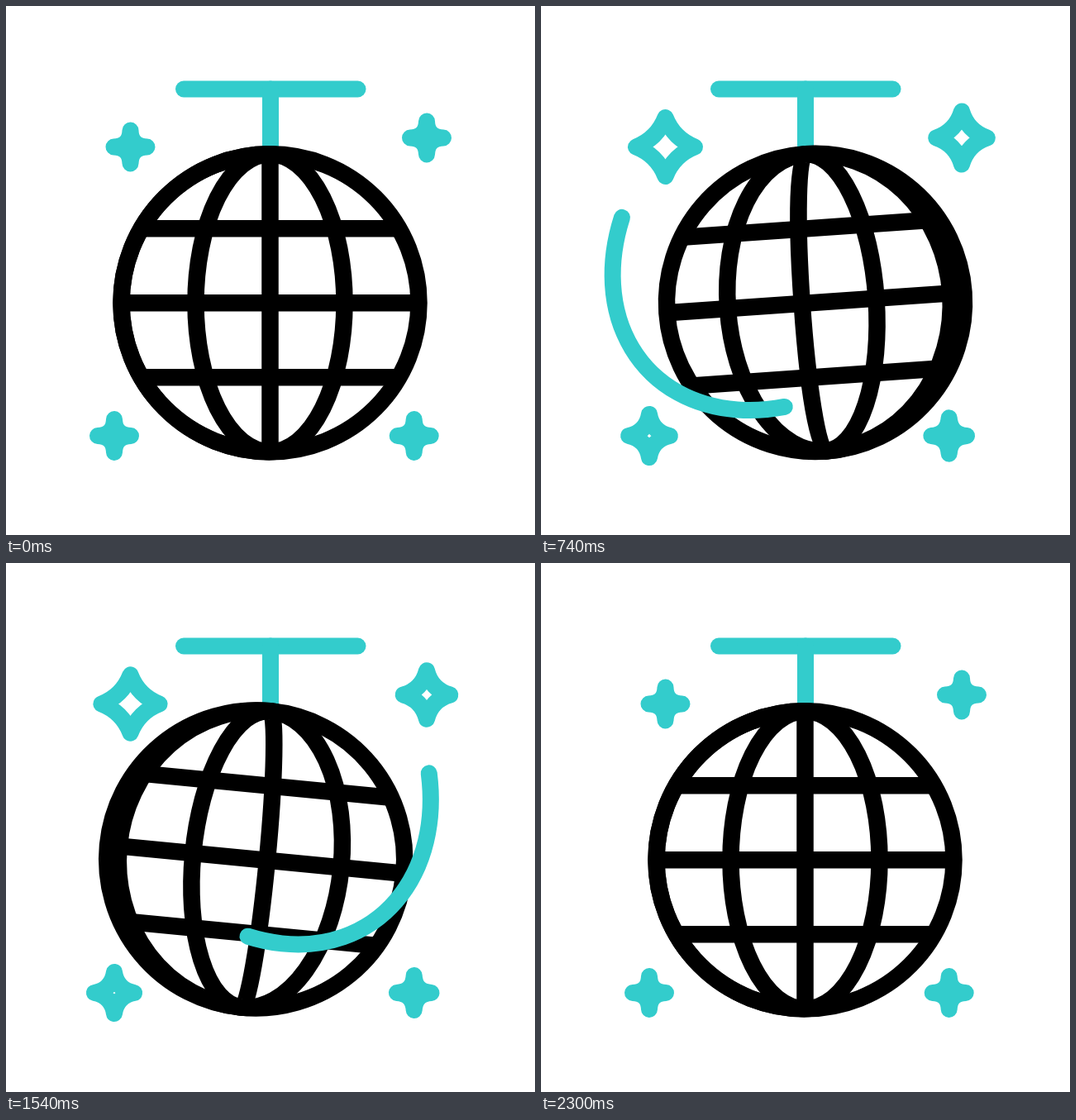
These frames come from a looping animation (640 by 640 pixels, 3200 ms). An HTML page with a canvas:

```html
<!DOCTYPE html>
<html lang="en">
<head>
<meta charset="utf-8">
<title>Swinging disco ball</title>
<style>
html, body { margin: 0; height: 100%; overflow: hidden; background: #fff; }
canvas { display: block; }
</style>
</head>
<body>
<canvas id="stage" width="640" height="640"></canvas>
<script>
const ctx = document.getElementById('stage').getContext('2d');
const LOOP = 3200, TEAL = '#33cccc', RAD = Math.PI / 180;

// Keyframes are [time, value] pairs, eased in and out between neighbours.
function tween(t, keys) {
  if (t <= keys[0][0]) return keys[0][1];
  for (let i = 1; i < keys.length; i++) {
    const [t0, a] = keys[i - 1], [t1, b] = keys[i];
    if (t < t1) {
      const x = (t - t0) / (t1 - t0);
      return a + (b - a) * x * x * (3 - 2 * x);
    }
  }
  return keys[keys.length - 1][1];
}

const SWING = [[260, 0], [765, 4], [1270, -10.1], [1950, 3], [2300, 0]];
const SPIN = [[260, 0], [920, 90], [1745, 0]];

// grow: horizontal and vertical growth of the tips at the peak of a pulse
const STARS = [
  { x: 150.5, y: 170.5, grow: [15.7, 15.7], times: [290, 770, 1150, 1590, 1950] },
  { x: 509, y: 159.5, grow: [13, 14.5], times: [460, 840, 1280, 1720, 2060] },
  { x: 131, y: 520, grow: [15, 18.5], times: [606, 960, 1395, 1820, 2175] },
  { x: 493.7, y: 520, grow: [13.5, 16], times: [670, 1030, 1480, 1890, 2220] }
];

// Both swishes follow the blunt end of the same ellipse, turned by tilt.
const SWISHES = [
  { x: 307.3, y: 271.2, tilt: 136.5, from: 56.5, start: 260 },
  { x: 304.5, y: 232.7, tilt: 55.4, from: -56.5, start: 1092 }
];

function line(x0, y0, x1, y1) {
  ctx.beginPath();
  ctx.moveTo(x0, y0);
  ctx.lineTo(x1, y1);
  ctx.stroke();
}

function drawHanger() {
  ctx.strokeStyle = TEAL;
  line(215, 100.5, 425.5, 100.5);
  line(320, 100.5, 320, 172);
}

function drawGlobe(t) {
  const R = 180, shift = tween(t, SPIN);
  ctx.save();
  ctx.strokeStyle = '#000';
  ctx.lineWidth = 20.5;
  ctx.lineCap = 'butt';
  ctx.translate(319.5, 179.3);
  ctx.rotate(-tween(t, SWING) * RAD);
  ctx.translate(0, R);
  ctx.beginPath();
  ctx.arc(0, 0, R, 0, 2 * Math.PI);
  ctx.stroke();
  for (const y of [-90, 0, 90]) {
    const half = Math.sqrt(R * R - y * y);
    line(-half, y, half, y);
  }
  for (let x = shift - R; x < R; x += 90) {
    ctx.beginPath();
    ctx.ellipse(0, 0, Math.abs(x), R, 0, -Math.PI / 2, Math.PI / 2, x < 0);
    ctx.stroke();
  }
  ctx.restore();
}

function drawStar(t, { x, y, grow, times }) {
  const pulse = tween(t, times.map((time, i) => [time, i % 2]));
  const [rx, ry] = grow.map(g => 20 + g * pulse);
  // The sides bend less as the star opens.
  const [cx, cy] = [rx, ry].map(r => 0.6 * r - 11.3);
  ctx.strokeStyle = TEAL;
  ctx.beginPath();
  ctx.moveTo(x, y - ry);
  ctx.quadraticCurveTo(x + cx, y - cy, x + rx, y);
  ctx.quadraticCurveTo(x + cx, y + cy, x, y + ry);
  ctx.quadraticCurveTo(x - cx, y + cy, x - rx, y);
  ctx.quadraticCurveTo(x - cx, y - cy, x, y - ry);
  ctx.closePath();
  ctx.stroke();
}

function drawSwish(t, { x, y, tilt, from, start }) {
  const sweep = begin => tween(t, [[begin, from], [begin + 560, -from]]);
  const head = sweep(start), tail = sweep(start + 440);
  if (head === tail) return;
  ctx.strokeStyle = TEAL;
  ctx.beginPath();
  ctx.ellipse(x, y, 245, 190, tilt * RAD, tail * RAD, head * RAD, head < tail);
  ctx.stroke();
}

function draw(now) {
  const t = now % LOOP;
  ctx.clearRect(0, 0, 640, 640);
  ctx.lineWidth = 20;
  ctx.lineCap = ctx.lineJoin = 'round';
  drawHanger();
  drawGlobe(t);
  STARS.forEach(star => drawStar(t, star));
  SWISHES.forEach(swish => drawSwish(t, swish));
  requestAnimationFrame(draw);
}

requestAnimationFrame(draw);
</script>
</body>
</html>
```
